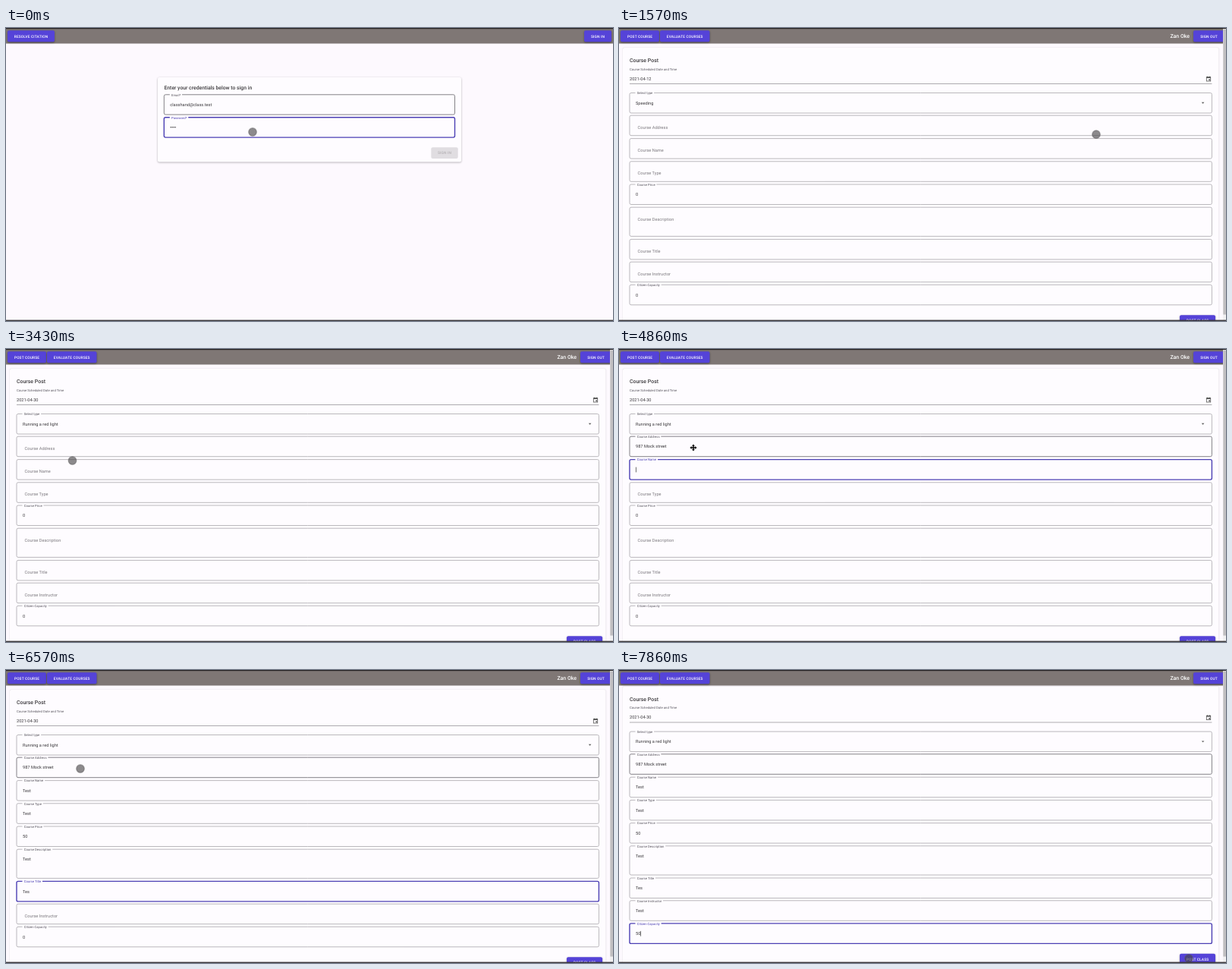
Recreate the animation shown at these times as an HTML page with a canvas. Size 800x386 px, loop 8 s.

```html
<!DOCTYPE html>
<html lang="en">
<head>
<meta charset="utf-8">
<title>Course Post</title>
<style>
  html, body { margin: 0; width: 100%; height: 100%; overflow: hidden; background: #fdf9fe; }
  canvas { display: block; width: 800px; height: 386px; }
</style>
</head>
<body>
<canvas id="stage"></canvas>
<script>
const LOOP = 8000, STEP = 1000 / 7;
const FORM_AT = 425, DATE_AT = 1700, MENU_OPEN = 2130, MENU_CLOSE = 2840;
const HOVER_AT = 3500, SCROLL_AT = 7420, SCROLL_BY = 4.4;
const PURPLE = '#5543d8', FOCUS = '#4c40b4', PAGE = '#fdf9fe', CARD = '#fefcff';
const INK = '#3c3a3d', MUTED = '#7d7a7f', LINE = '#b3b0b5';
const BODY = 5.65, SMALL = 4.24, TITLE = 6.95;

const FIELDS = [
  { label: 'Course Address', y: 115.2, text: '987 Mock street', focus: 3500, type: 3640, key: 60 },
  { label: 'Course Name', y: 145.6, text: 'Test', focus: 4640, type: 4900, key: 70 },
  { label: 'Course Type', y: 175.8, text: 'Test', focus: 5260, type: 5300, key: 80 },
  { label: 'Course Price', y: 206, initial: '0', text: '50', focus: 5680, type: 5720, key: 110 },
  { label: 'Course Description', y: 236.2, h: 38.2, text: 'Test', focus: 6000, type: 6040, key: 70 },
  { label: 'Course Title', y: 278.4, text: 'Tes', focus: 6370, type: 6400, key: 55 },
  { label: 'Course Instructor', y: 308.2, text: 'Test', focus: 6700, type: 6740, key: 90 },
  { label: 'Citizen Capacity', y: 338.3, initial: '0', text: '50', focus: 7130, type: 7180, key: 110 }
];
const OFFENCES = ['Running a red light', 'Seat belt violations', 'Failure to follow the right of way',
  'Failure to signal when changing lanes', 'Speeding', 'Driving over a median',
  'Driving illegally', 'Running over a pedestrian lane'];

// time, x, y
const POINTER = [
  [0, 325, 137], [280, 332, 140], [710, 410, 166], [1140, 770, 70], [1430, 700, 130],
  [1710, 560, 150], [2000, 110, 100], [2290, 102.5, 163.5], [2570, 70, 130], [2720, 52, 98],
  [2860, 60, 108], [3140, 87.5, 147], [3430, 87.5, 147], [3570, 98, 130], [7280, 98, 130],
  [7710, 740, 376], [7860, 751, 380]
];

const canvas = document.getElementById('stage');
const ctx = canvas.getContext('2d');
const dpr = window.devicePixelRatio || 1;
canvas.width = 800 * dpr;
canvas.height = 386 * dpr;

function rect(x, y, w, h, color) {
  ctx.fillStyle = color;
  ctx.fillRect(x, y, w, h);
}

function roundRect(x, y, w, h, r) {
  ctx.beginPath();
  ctx.roundRect(x, y, w, h, r);
}

// y is the middle of the capitals
function text(str, x, y, { size = BODY, color = INK, weight = 400, align = 'left', spacing = 0 } = {}) {
  ctx.font = `${weight} ${size}px Roboto, sans-serif`;
  ctx.textRendering = 'geometricPrecision';
  ctx.letterSpacing = spacing + 'px';
  ctx.textAlign = align;
  ctx.fillStyle = color;
  ctx.fillText(str, x, y + size * 0.355);
  return ctx.measureText(str).width;
}

function raised(x, y, w, h, r, fill, blur, drop, shade) {
  ctx.save();
  ctx.shadowColor = shade;
  ctx.shadowBlur = blur * dpr;
  ctx.shadowOffsetY = drop * dpr;
  ctx.fillStyle = fill;
  roundRect(x, y, w, h, r);
  ctx.fill();
  ctx.restore();
}

function button(label, x, y, w, h = 15) {
  raised(x, y, w, h, 2, PURPLE, 2.5, 1, 'rgba(0,0,0,.4)');
  text(label, x + w / 2, y + h / 2, { size: 4.85, weight: 500, color: '#fff', align: 'center', spacing: 0.13 });
}

function outline(x, y, w, h, color, width) {
  ctx.strokeStyle = color;
  ctx.lineWidth = width;
  roundRect(x, y, w, h, 2);
  ctx.stroke();
}

function field({ label, x = 14, y, w = 767.4, h = 26.5, value = '', focused, hover, caret }) {
  const floating = focused || value !== '';
  outline(x, y, w, h, focused ? FOCUS : hover ? '#77747a' : LINE, focused ? 1.4 : 0.9);
  if (!floating) {
    text(label, x + 10.5, y + 15.5, { color: MUTED });
    return;
  }
  ctx.font = `400 ${SMALL}px Roboto, sans-serif`;
  ctx.letterSpacing = '0px';
  rect(x + 7.5, y - 1.5, ctx.measureText(label).width + 4, 3, CARD);
  text(label, x + 9.7, y + 0.2, { size: SMALL, color: focused ? FOCUS : '#55525a' });
  const width = text(value, x + 8, y + 13.2);
  if (caret) rect(x + 8 + width, y + 10, 0.7, 6.8, '#333');
}

function header(right, labels, rightX, rightW) {
  rect(0, 0, 800, 20.5, '#7f7775');
  rect(0, 0, 800, 1.2, '#242122');
  labels.forEach(([label, x, w]) => button(label, x, 3.3, w));
  button(right, rightX, 3.3, rightW);
}

function signIn() {
  header('SIGN IN', [['RESOLVE CITATION', 2, 62]], 762, 36);
  raised(200, 65, 400, 111.5, 2, CARD, 2.5, 0.8, 'rgba(0,0,0,.32)');
  text('Enter your credentials below to sign in', 208.5, 78.3, { size: 6.8, weight: 500 });
  const box = { x: 208.3, w: 383.2, h: 26.3 };
  field({ ...box, label: 'Email*', y: 87.8, value: 'classhand@class.test', hover: true });
  field({ ...box, label: 'Password*', y: 117.8, focused: true });
  ctx.fillStyle = INK;
  for (let i = 0; i < 4; i++) {
    ctx.beginPath();
    ctx.arc(217.2 + i * 2, 130.8, 0.75, 0, 7);
    ctx.fill();
  }
  ctx.fillStyle = '#e0dde1';
  roundRect(560.3, 157.2, 35.4, 14.8, 2);
  ctx.fill();
  text('SIGN IN', 578, 164.6, { size: 4.85, weight: 500, color: '#b5b2b6', align: 'center', spacing: 0.13 });
}

function calendarIcon(x, y) {
  ctx.strokeStyle = '#555';
  ctx.lineWidth = 0.8;
  ctx.strokeRect(x - 2.7, y - 2.3, 5.4, 5.3);
  rect(x - 2.7, y - 2.6, 5.4, 1.6, '#555');
  rect(x - 2.1, y - 3.4, 0.8, 1.2, '#555');
  rect(x + 1.3, y - 3.4, 0.8, 1.2, '#555');
  rect(x + 0.2, y + 0.4, 1.7, 1.7, '#555');
}

function menu() {
  raised(14, 81.5, 767.8, 165, 2, '#fff', 7, 2.5, 'rgba(0,0,0,.5)');
  ctx.save();
  ctx.beginPath();
  ctx.rect(14, 81.5, 768, 165);
  ctx.clip();
  rect(777.4, 81.5, 4.4, 165, '#f1f0f2');
  rect(777.4, 82, 4.4, 123, '#c0bec1');
  OFFENCES.forEach((name, i) => text(name, 22.8, 96.6 + i * 21.07, { size: 5.57 }));
  ctx.restore();
}

function fieldState(f, i, t) {
  const next = FIELDS[i + 1];
  const typed = Math.max(0, Math.floor((t - f.type) / f.key));
  const focused = t >= f.focus && (!next || t < next.focus);
  const idle = typed === 0 || t > f.type + f.key * f.text.length + 200;
  return {
    label: f.label, y: f.y, h: f.h, focused,
    value: f.text.slice(0, typed) || f.initial || '',
    caret: focused && idle,
    hover: i === 0 && t >= HOVER_AT
  };
}

function courseForm(t) {
  ctx.save();
  ctx.translate(0, t >= SCROLL_AT ? -SCROLL_BY : 0);
  raised(5, 26, 785.5, 380, 2, CARD, 1.5, 0, 'rgba(0,0,0,.2)');
  text('Course Post', 14, 43, { size: TITLE, weight: 500 });
  text('Course Scheduled Date and Time', 14, 54, { size: SMALL, color: '#55525a' });
  text(t < DATE_AT ? '2021-04-12' : '2021-04-30', 14, 66.7);
  rect(14, 73, 767.4, 0.8, '#99969b');
  calendarIcon(777, 67);

  field({ label: 'Select type', y: 85.5, value: t < MENU_CLOSE ? 'Speeding' : OFFENCES[0] });
  ctx.fillStyle = '#555';
  ctx.beginPath();
  ctx.moveTo(767.8, 97.8);
  ctx.lineTo(771.4, 97.8);
  ctx.lineTo(769.6, 99.7);
  ctx.fill();

  FIELDS.forEach((f, i) => field(fieldState(f, i, t)));
  button('POST CLASS', 739, 378.2, 47);
  if (t >= MENU_OPEN && t < MENU_CLOSE) menu();
  ctx.restore();

  header('SIGN OUT', [['POST COURSE', 2, 51], ['EVALUATE COURSES', 54, 65.5]], 757, 41);
  text('Zan Oke', 752, 11, { size: TITLE, weight: 500, color: '#fff', align: 'right' });
  rect(796, 1.2, 4, 385, '#f1f0f2');
  rect(796.3, 2, 3.7, 375.5, '#c0bec1');
}

function pointerAt(t) {
  const i = POINTER.findIndex(p => p[0] > t);
  if (i < 0) return POINTER[POINTER.length - 1].slice(1);
  const [t0, x0, y0] = POINTER[i - 1], [t1, x1, y1] = POINTER[i];
  const k = (t - t0) / (t1 - t0), e = k * k * (3 - 2 * k);
  return [x0 + (x1 - x0) * e, y0 + (y1 - y0) * e];
}

function moveCursor(x, y) {
  ctx.save();
  ctx.translate(x, y);
  for (let i = 0; i < 4; i++) {
    rect(-0.8, -3, 1.6, 3, '#111');
    ctx.beginPath();
    ctx.moveTo(0, -4.6);
    ctx.lineTo(2, -2.3);
    ctx.lineTo(-2, -2.3);
    ctx.fill();
    ctx.rotate(Math.PI / 2);
  }
  ctx.restore();
}

function pointer(t) {
  const [x, y] = pointerAt(t);
  if (t > 4700 && t < 4950) return moveCursor(x, y);
  ctx.beginPath();
  ctx.arc(x, y, 5.3, 0, 7);
  ctx.fillStyle = 'rgba(70,68,70,.62)';
  ctx.fill();
  ctx.strokeStyle = 'rgba(90,88,90,.45)';
  ctx.lineWidth = 1.2;
  ctx.stroke();
}

function draw(t) {
  ctx.setTransform(dpr, 0, 0, dpr, 0, 0);
  rect(0, 0, 800, 386, PAGE);
  if (t < FORM_AT) signIn();
  else courseForm(t);
  pointer(t);
  rect(0, 384.6, 800, 1.4, '#3a383b');
}

const start = performance.now();
function tick() {
  const t = (performance.now() - start) % LOOP;
  draw(Math.floor((t + 5) / STEP) * STEP);
  requestAnimationFrame(tick);
}
tick();
</script>
</body>
</html>
```
